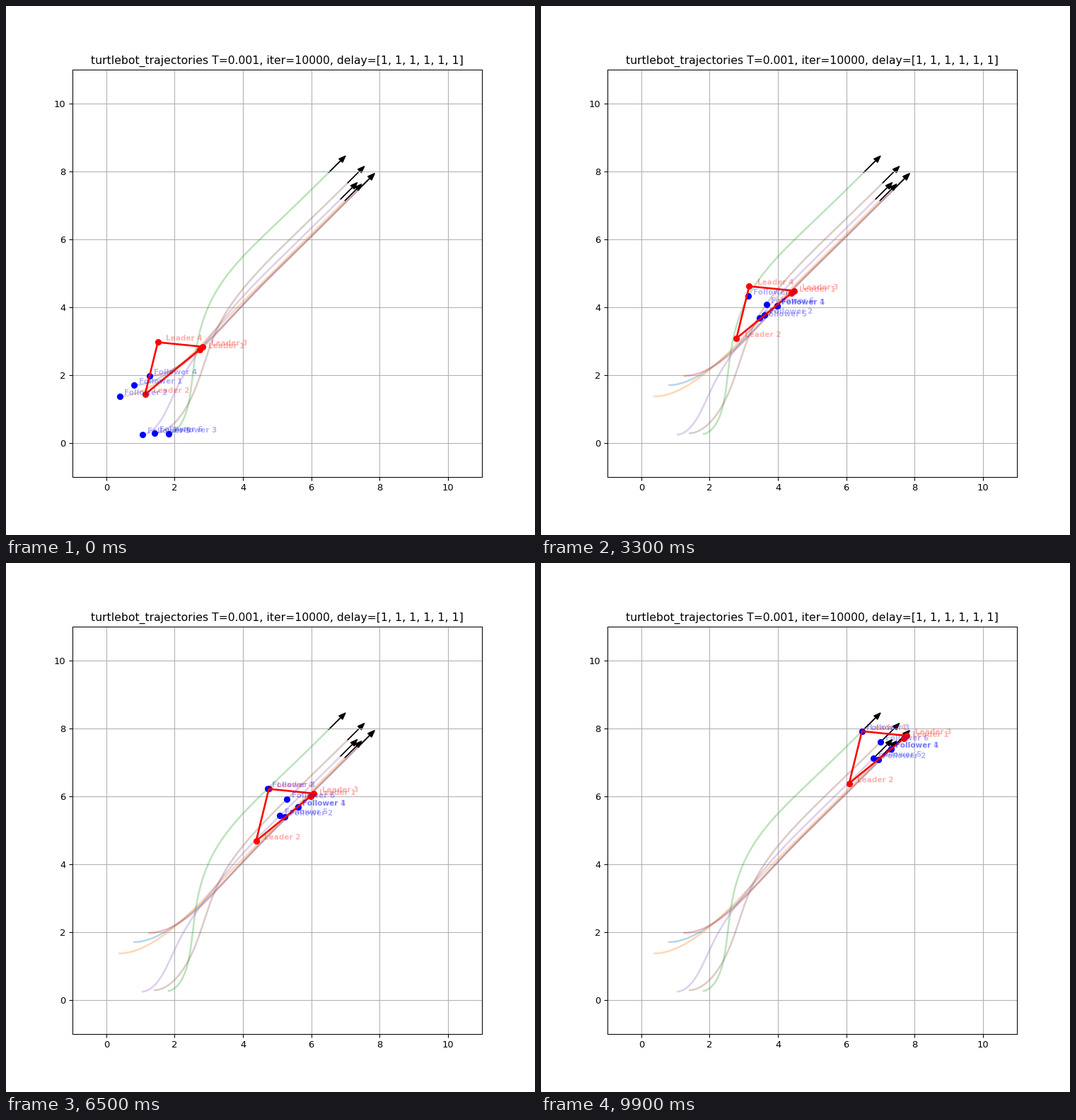
Animation of 748x748 px, one loop 10000 ms. Source, as a matplotlib script:

```python
import numpy as np
import matplotlib.pyplot as plt
from matplotlib.animation import FuncAnimation

T = 0.001           # simulation step, seconds
ITERATIONS = 10000
FRAMES = 100
GAIN = 0.7          # attraction per neighbour
ARM = 0.6           # larger values make the robots turn more slowly
VELOCITY = 0.5 + 0.5j

# Planar points are complex numbers x + iy
LEADERS = np.array([2.738 + 2.752j, 1.135 + 1.43j, 2.823 + 2.832j, 1.508 + 2.964j])
STARTS = np.array([0.819 + 1.702j, 0.391 + 1.369j, 1.825 + 0.265j,
                   1.260 + 1.973j, 1.068 + 0.244j, 1.419 + 0.286j])
HULL = [0, 1, 3, 2, 0]

# Neighbours of each follower: 0-3 are leaders, 4-9 are followers
LINKS = [(0, 5), (1, 2), (3,), (0, 5), (1, 4, 9), (2, 6, 8)]


def simulate():
    """Unicycle followers steering towards their neighbours."""
    adjacency = np.zeros((len(STARTS), len(LEADERS) + len(STARTS)))
    for row, links in zip(adjacency, LINKS):
        row[list(links)] = 1
    degree = adjacency.sum(axis=1)

    path = np.empty((ITERATIONS + 1, len(STARTS)), complex)
    path[0] = STARTS
    angle = np.zeros(len(STARTS))
    for i in range(ITERATIONS):
        robots = path[i]
        points = np.concatenate([LEADERS + VELOCITY * i * T, robots])
        wish = GAIN * (adjacency @ points - degree * robots) + VELOCITY
        heading = np.exp(1j * angle)
        local = wish * heading.conj()
        path[i + 1] = robots + T * local.real * heading
        angle += T * local.imag / ARM
    return path, angle


def make_labels(name, color, count):
    return [ax.text(0, 0, f"{name} {n + 1}", color=color, alpha=0.3, size=8,
                    weight="bold", ha="center", va="bottom")
            for n in range(count)]


def place(dots, labels, points):
    dots.set_data(points.real, points.imag)
    for label, p in zip(labels, points):
        label.set_position((p.real + 0.77, p.imag))


fig, ax = plt.subplots(figsize=(8, 8), dpi=93.5)
ax.set(xlim=(-1, 11), ylim=(-1, 11))
ax.grid(True)
ax.set_title(f"turtlebot_trajectories T={T}, iter={ITERATIONS}, "
             f"delay={[1] * len(STARTS)}")

path, angle = simulate()
for n, track in enumerate(path.T):
    ax.plot(track[::10].real, track[::10].imag, color=f"C{n}", lw=2, alpha=0.3)
    ax.arrow(track[-1].real, track[-1].imag,
             0.5 * np.cos(angle[n]), 0.5 * np.sin(angle[n]),
             head_width=0.15, head_length=0.2, color="k")

leader_dots, = ax.plot([], [], "o", color="red")
follower_dots, = ax.plot([], [], "o", color="blue")
hull, = ax.plot([], [], color="red", lw=2)
leader_labels = make_labels("Leader", "red", len(LEADERS))
follower_labels = make_labels("Follower", "blue", len(STARTS))


def update(frame):
    step = frame * ITERATIONS // FRAMES
    lead = LEADERS + VELOCITY * step * T
    place(leader_dots, leader_labels, lead)
    place(follower_dots, follower_labels, path[step])
    hull.set_data(lead[HULL].real, lead[HULL].imag)
    return [leader_dots, follower_dots, hull, *leader_labels, *follower_labels]


anim = FuncAnimation(fig, update, frames=FRAMES, interval=100, repeat=True,
                     repeat_delay=0, blit=False)
plt.show()
```
